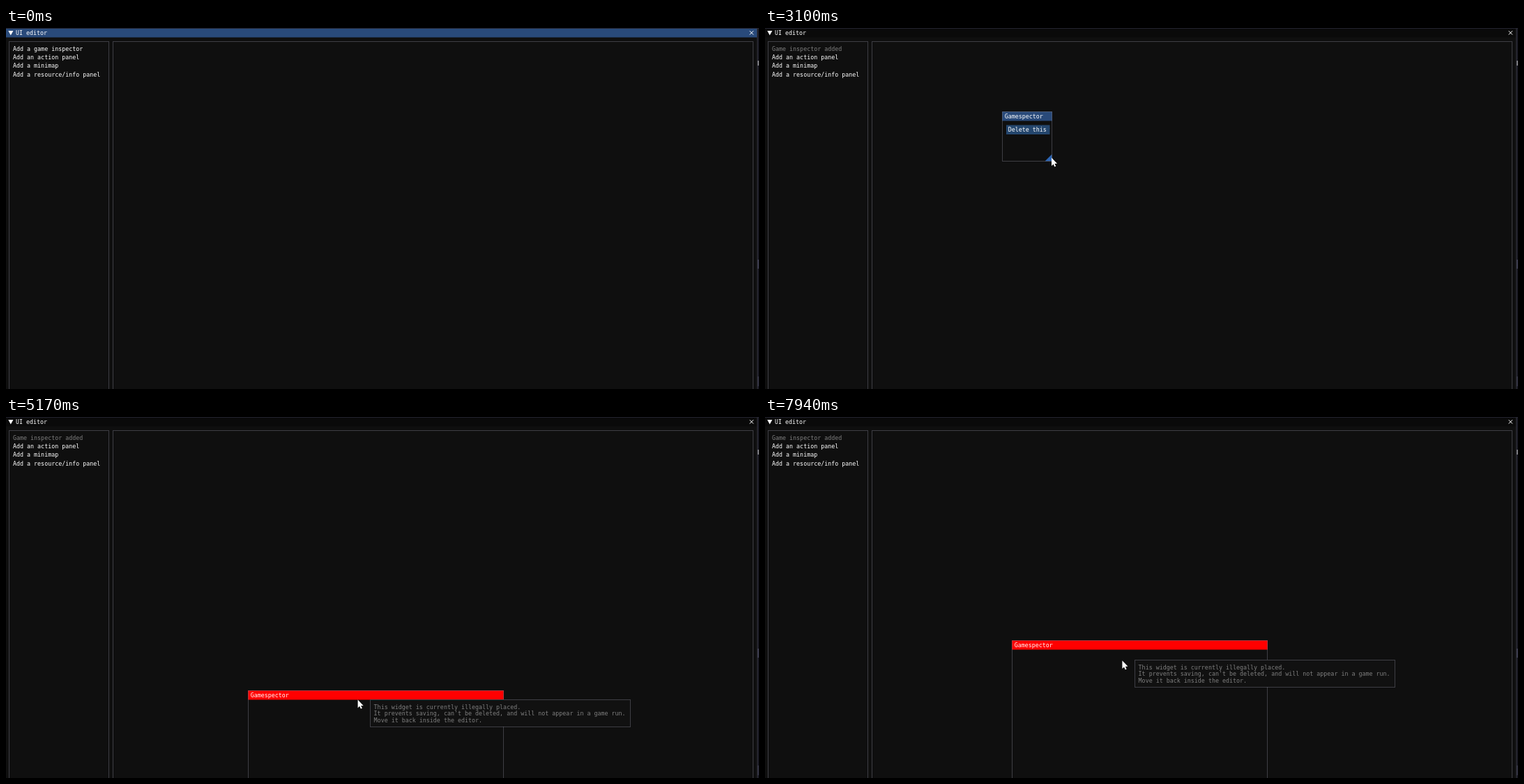
These frames come from a looping animation (1080 px wide and 519 px high, 8 s). An HTML page with a canvas:

```html
<!DOCTYPE html>
<html lang="en">
<head>
<meta charset="utf-8">
<title>UI editor</title>
<style>
html, body { margin: 0; width: 100%; height: 100%; overflow: hidden; background: #0f0f0f; }
canvas { display: block; }
</style>
</head>
<body>
<canvas id="stage" width="1080" height="519"></canvas>
<script>
const ctx = document.getElementById('stage').getContext('2d');
const LOOP = 8000, STEP = 67;
const BG = '#0f0f0f', BORDER = 'rgba(110, 110, 122, .5)', WHITE = '#ffffff', GREY = '#7f7f7f';
const TITLE_ON = '#294a7a', TITLE_OFF = '#0a0a0a', BUTTON = '#24466d';

// Key moments
const ADDED = 1490, FOCUSED = 2180, DROPPED = 5170, LIFTED = 6740, REDROPPED = 7530, TIP_BACK = 7730;

// Pointer script: where each move goes, and what it drags along
const move = (from, to, x, y, drag) => ({ from, to, x, y, drag });
const moves = [
  move(150, 730, 120, 48),
  move(880, 1270, 88, 26),
  move(1760, 1975, 201, 58),
  move(2190, 2400, 388, 158, 'place'),
  move(2480, 2680, 420, 181),
  move(2830, 2950, 411, 186),
  move(3240, 3550, 706, 337, 'size'),
  move(3700, 4250, 496, 129),
  move(4510, 4510, 497.2, 133),
  move(4515, 4780, 504.4, 394, 'place'),
  move(4850, 4920, 504.6, 406, 'place'),
  move(6660, 6990, 511.6, 334, 'place'),
  move(TIP_BACK, 7940, 512.4, 349.6)
];
const presses = [[1337, ADDED], [FOCUSED, 2470], [3170, 3690], [4440, DROPPED], [6590, REDROPPED]];
const held = t => presses.some(([a, b]) => t >= a && t < b);

// Share of a move done: equal hops, the first one at its start
function progress({ from, to }, t) {
  if (t < from) return 0;
  if (t >= to) return 1;
  const hops = Math.round((to - from) / STEP);
  return (Math.floor((t - from) / (to - from) * hops) + 1) / (hops + 1);
}

function pose(t) {
  const pointer = { x: 1110, y: 556 };
  const box = { x: 153, y: 20, w: 71, h: 71 };
  let last = { ...pointer };
  for (const m of moves) {
    const u = progress(m, t), dx = (m.x - last.x) * u, dy = (m.y - last.y) * u;
    pointer.x += dx;
    pointer.y += dy;
    if (m.drag === 'place') { box.x += dx; box.y += dy; }
    if (m.drag === 'size') { box.w += dx; box.h += dy; }
    last = m;
  }
  for (const k in box) box[k] = Math.round(box[k]);
  return { pointer, box };
}

function fill(color, x, y, w, h) {
  ctx.fillStyle = color;
  ctx.fillRect(x, y, w, h);
}

function frame(x, y, w, h) {
  ctx.strokeStyle = BORDER;
  ctx.lineWidth = 1;
  ctx.strokeRect(x + .5, y + .5, w, h);
}

function poly(color, points) {
  ctx.fillStyle = color;
  ctx.beginPath();
  points.forEach(([x, y]) => ctx.lineTo(x, y));
  ctx.fill();
}

function label(text, x, y, color = WHITE) {
  ctx.font = '8.33px "DejaVu Sans Mono", monospace';
  ctx.fillStyle = color;
  ctx.fillText(text, x, y);
}

function drawEditor(t) {
  fill(BG, 0, 0, 1080, 519);
  fill('#1b1b24', 1078, 0, 2, 519);
  fill('#77777c', 1078, 47, 2, 7);
  fill('#3a3a4c', 1078, 333, 2, 13);
  fill('#30303e', 1078, 501, 2, 14);
  fill('#22222e', 0, 0, 1080, 1);
  fill(t < FOCUSED ? TITLE_ON : TITLE_OFF, 0, 1, 1077, 12.5);
  fill('#2c2c33', 1077, 0, 1, 519);
  poly(WHITE, [[3.3, 4], [10.4, 4], [6.8, 10.5]]);
  label('UI editor', 14, 10);
  ctx.strokeStyle = WHITE;
  ctx.lineWidth = 1;
  ctx.beginPath();
  ctx.moveTo(1066.7, 4.2); ctx.lineTo(1072, 9.6);
  ctx.moveTo(1072, 4.2); ctx.lineTo(1066.7, 9.6);
  ctx.stroke();
  frame(4, 19, 143, 520);
  frame(153, 19, 918, 520);

  const added = t >= ADDED;
  if (t >= 1100 && !added) fill('#3169a9', 7, 24, 106, 12);
  label(added ? 'Game inspector added' : 'Add a game inspector', 10, 33, added ? GREY : WHITE);
  ['Add an action panel', 'Add a minimap', 'Add a resource/info panel']
    .forEach((s, i) => label(s, 10, 45.2 + i * 12.2));
}

function drawWidget(t, { x, y, w, h }, illegal) {
  const focused = t >= FOCUSED;
  fill(BG, x, y, w + 1, h + 1);
  fill(illegal ? '#ff0000' : focused ? TITLE_ON : TITLE_OFF, x, y, w + 1, 13.5);
  label('Gamespector', x + 3.7, y + 10);
  if (focused && !illegal) {
    ctx.save();
    ctx.beginPath();
    ctx.rect(x, y, w - 2.5, h);
    ctx.clip();
    fill(BUTTON, x + 6, y + 19.5, 96, 13.5);
    label('Delete this widget', x + 8.7, y + 29.3);
    ctx.restore();
  }
  const r = x + w + .5, b = y + h + .5;
  const gripped = t >= 2880 && t < 3690;
  poly(gripped ? '#2c65b3' : focused ? '#1e2637' : '#1a2b45', [[r, b], [r, b - 10], [r - 10, b]]);
  frame(x, y, w, h);
}

function drawTip(pointer) {
  const x = Math.round(pointer.x + 17.2), y = Math.round(pointer.y - .4);
  fill('#111111', x, y, 373, 39);
  frame(x, y, 373, 39);
  ['This widget is currently illegally placed.',
   "It prevents saving, can't be deleted, and will not appear in a game run.",
   'Move it back inside the editor.'
  ].forEach((s, i) => label(s, x + 5.6, y + 13.7 + i * 9.4, GREY));
}

function drawPointer({ x, y }, pressed) {
  const shape = [[0, 0], [0, 11.6], [2.6, 9.2], [4.3, 13], [6.2, 12.2], [4.5, 8.5], [8, 8.3]];
  poly(WHITE, shape.map(([dx, dy]) => [x + dx, y + dy + .6]));
  if (!pressed) return;
  ctx.fillStyle = 'rgba(255, 242, 20, .6)';
  ctx.beginPath();
  ctx.arc(x, y, 9, 0, Math.PI * 2);
  ctx.fill();
}

function draw(t) {
  const { pointer, box } = pose(t);
  const lifted = t >= LIFTED;
  const illegal = t >= DROPPED && !lifted || t >= REDROPPED;
  drawEditor(t);
  if (t >= ADDED) drawWidget(t, box, illegal);
  if (illegal && (!lifted || t >= TIP_BACK)) drawTip(pointer);
  drawPointer(pointer, held(t));
}

const start = performance.now();
function tick() {
  draw((performance.now() - start) % LOOP);
  requestAnimationFrame(tick);
}
tick();
</script>
</body>
</html>
```
